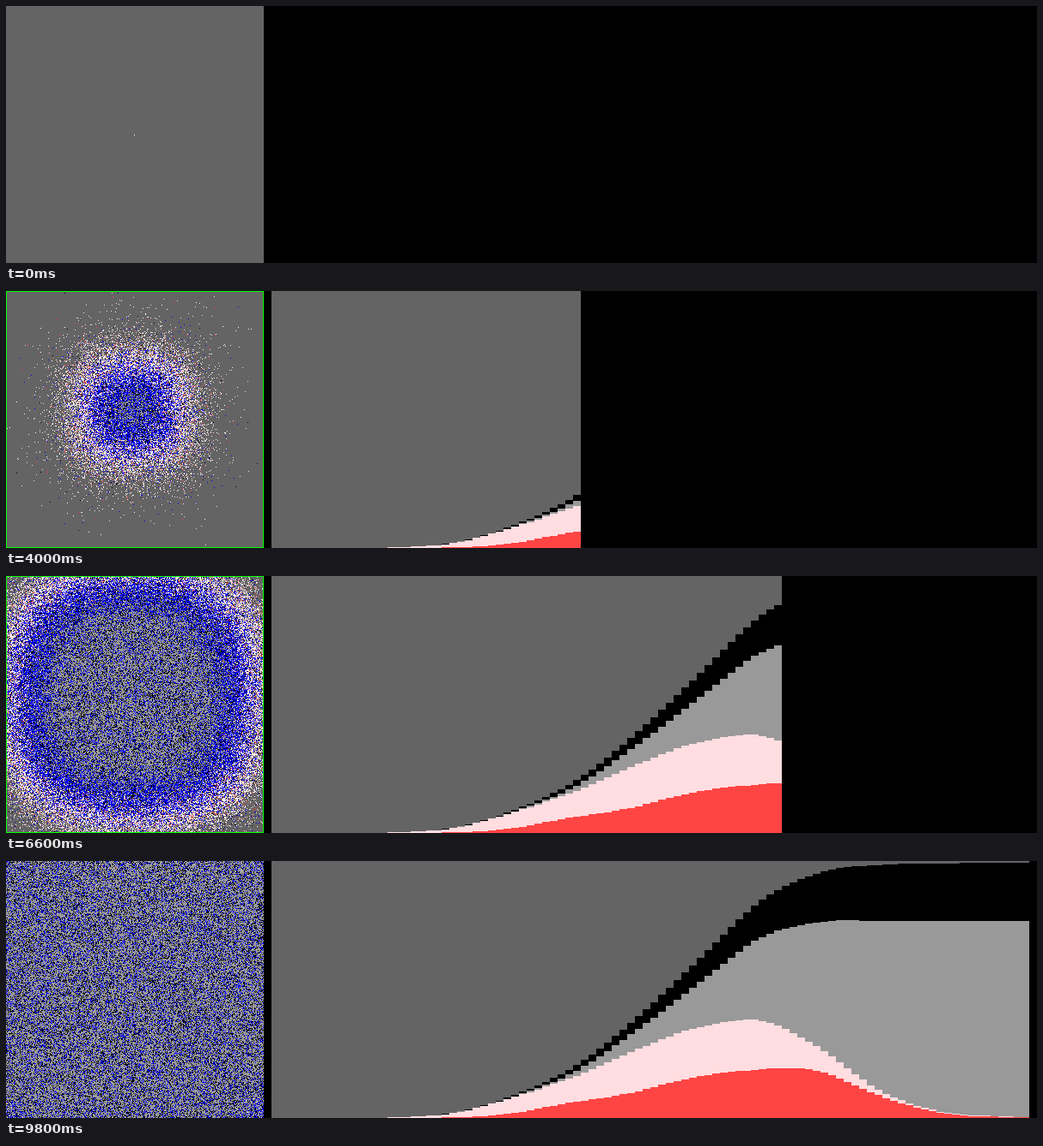
Recreate the animation shown at these times as an HTML page with a canvas. Size 1200 by 300 pixels, loop 10 s.

```html
<!DOCTYPE html>
<html lang="en">
<head>
<meta charset="utf-8">
<title>Epidemic spread</title>
<style>
  html, body { margin: 0; width: 100%; height: 100%; overflow: hidden; background: #000; }
  canvas { display: block; }
</style>
</head>
<body>
<canvas id="stage" width="1200" height="300"></canvas>
<script>
const ctx = document.getElementById('stage').getContext('2d');
const SIZE = 300, COLUMN = 9, STEP_MS = 200, STEPS = 50, DAYS_PER_STEP = 2;

// Course of the disease, in days after infection.
const ONSET = 6.7, DEATH = 7.5, RECOVERY = 15, DEATH_RATE = 0.228;

const COLORS = {
  healthy: [100, 100, 100], white: [255, 255, 255], pink: [255, 221, 224], red: [255, 68, 68],
  blue: [0, 0, 255], immune: [153, 153, 153], dead: [0, 0, 0]
};
const css = name => `rgb(${COLORS[name]})`;

// Everyone ever infected, as chart height: one key point every 8 days, smoothly joined.
const KEYS = [0, 0.05, 0.7, 6, 27, 62, 119, 187, 255, 288, 295.7, 297.3, 298, 298];

function infectedBy(day) {
  const pos = Math.max(0, day / 8), i = Math.floor(pos), f = pos - i;
  const [a, b, c, d] = [-1, 0, 1, 2].map(k => KEYS[Math.min(KEYS.length - 1, Math.max(0, i + k))]);
  return b + f / 2 * (c - a + f * (2 * a - 5 * b + 4 * c - d + f * (3 * (b - c) + d - a)));
}

// Layer heights above the chart's base, tallest first.
function chartLayers(day) {
  const total = infectedBy(day);
  const dead = DEATH_RATE * infectedBy(day - DEATH);
  const immune = (1 - DEATH_RATE) * infectedBy(day - RECOVERY);
  return {
    dead: total,
    immune: total - dead,
    pink: total - dead - immune,
    red: infectedBy(day - ONSET) - dead - immune
  };
}

let seed = 20;
function random() {
  seed = seed + 0x6D2B79F5 | 0;
  let t = Math.imul(seed ^ seed >>> 15, 1 | seed);
  t = t + Math.imul(t ^ t >>> 7, 61 | t) ^ t;
  return ((t ^ t >>> 14) >>> 0) / 4294967296;
}
const gaussian = () => Math.sqrt(-2 * Math.log(1 - random())) * Math.cos(2 * Math.PI * random());

// Cells catch the disease in order of reach: a rounded-square distance with scatter.
function makeCell(_, index) {
  const x = index % SIZE, y = Math.floor(index / SIZE);
  const distance = (Math.abs(x - 146) ** 2.6 + Math.abs(y - 139) ** 2.6) ** (1 / 2.6);
  const first = x === 149 && y === 150;
  const spared = random() < 0.007;
  const scatter = 13 * gaussian() + 12 * Math.log(1 - random());
  const tint = random(), fate = random();
  const onset = ONSET - 1.5 + 3 * random();
  return {
    reach: first ? -SIZE : spared ? 2 * SIZE : distance + scatter,
    sick: first ? 'white' : tint < 0.1 ? 'red' : tint < 0.4 ? 'white' : 'pink',
    onset,
    recovery: onset + RECOVERY - ONSET,
    fate: fate < DEATH_RATE ? 'dead' : fate < 0.41 ? 'blue' : 'immune'
  };
}
const cells = Array.from({ length: SIZE * SIZE }, makeCell);

let startDay = 0;
[...cells].sort((a, b) => a.reach - b.reach).forEach((cell, rank) => {
  while (startDay < 100 && infectedBy(startDay) * SIZE < rank) startDay += 0.05;
  cell.start = startDay;
});

function cellState(cell, day) {
  const age = day - cell.start;
  if (age < 0) return 'healthy';
  if (age < cell.onset) return cell.sick;
  if (cell.fate === 'dead') return 'dead';
  return age < cell.recovery ? 'blue' : cell.fate;
}

const image = ctx.createImageData(SIZE, SIZE);
image.data.fill(255);

function drawGrid(day) {
  cells.forEach((cell, i) => image.data.set(COLORS[cellState(cell, day)], 4 * i));
  ctx.putImageData(image, 0, 0);
  if (day >= 28 && day <= 88) {
    ctx.strokeStyle = '#0f0';
    ctx.strokeRect(0.5, 0.5, SIZE - 1, SIZE - 1);
  }
}

function drawChart(lastDay) {
  for (let day = 1; day <= lastDay; day++) {
    const x = SIZE + day * COLUMN;
    ctx.fillStyle = css('healthy');
    ctx.fillRect(x, 0, COLUMN, SIZE);
    for (const [name, value] of Object.entries(chartLayers(day))) {
      const height = Math.max(0, Math.round(value));
      ctx.fillStyle = css(name);
      ctx.fillRect(x, SIZE - height, COLUMN, height);
    }
  }
}

let shown = -1;
function frame() {
  const step = Math.floor(performance.now() / STEP_MS) % STEPS;
  if (step !== shown) {
    shown = step;
    ctx.fillStyle = '#000';
    ctx.fillRect(0, 0, 1200, SIZE);
    drawGrid(step * DAYS_PER_STEP);
    drawChart(step * DAYS_PER_STEP);
  }
  requestAnimationFrame(frame);
}
frame();
</script>
</body>
</html>
```
